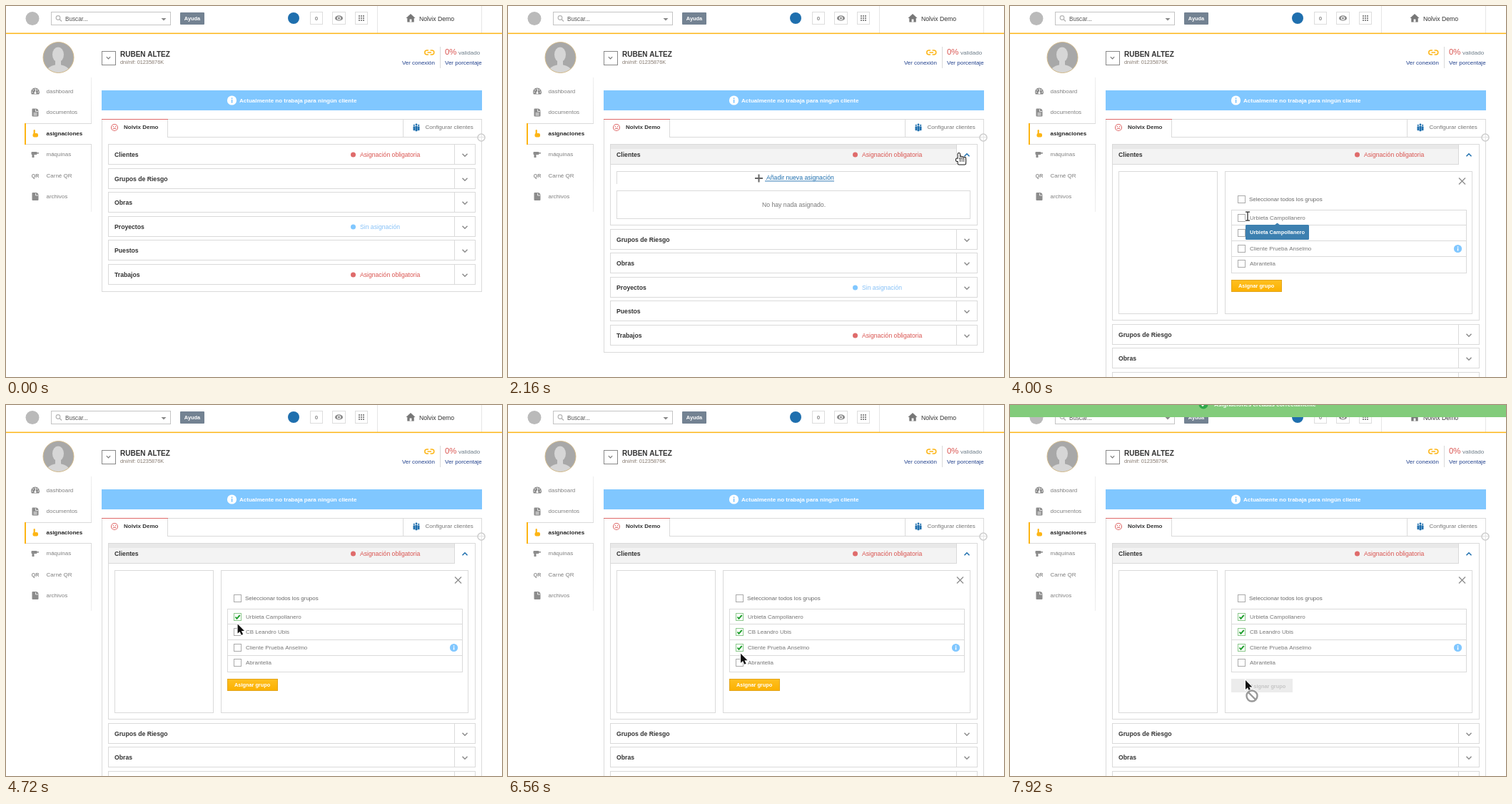
Animation of 695x519 px, one loop 8000 ms. Source, as an HTML page with a canvas:

```html
<!DOCTYPE html>
<html lang="es">
<head>
<meta charset="utf-8">
<title>Asignaciones</title>
<style>
html, body { margin: 0; width: 100%; height: 100%; overflow: hidden; background: #fff; }
canvas { display: block; width: 695px; height: 519px; }
</style>
</head>
<body>
<canvas id="stage"></canvas>
<script>
const W = 695, H = 519, LOOP = 8000, STEP = 80;
const canvas = document.getElementById('stage');
const c = canvas.getContext('2d');
const ratio = window.devicePixelRatio || 1;
canvas.width = W * ratio;
canvas.height = H * ratio;

const LINE = '#dadada', GREY = '#777', DARK = '#333', RED = '#d9534f', DOT = '#df6b6b';
const BLUE = '#1f6fae', SKY = '#80c7ff', GOLD = '#fdb515', ICON = '#8c8c8c';
const TENANT = 'Nolvix Demo';
const MENU = ['dashboard', 'documentos', 'asignaciones', 'máquinas', 'Carné QR', 'archivos'];
const SECTIONS = ['Clientes', 'Grupos de Riesgo', 'Obras', 'Proyectos', 'Puestos', 'Trabajos'];
const GROUPS = ['Urbieta Campollanero', 'CB Leandro Ubis', 'Cliente Prueba Anselmo', 'Abrantelia'];

// Moments of the story, in ms
const OPEN = 2160, FORM = 3280, SENT = 7360, NOTICE = 7725;
const TICKS = [4320, 5200, 6240];
const CLICKS = [1920, 3120, 3200, ...TICKS, 7200];

// Pointer moves: it leaves at `from` and reaches x, y at `to`
const ENTER = { to: 1040, x: 694, y: 318 };
const MOVES = [
  { from: 1040, to: 1600, x: 604, y: 234 },
  { from: 1600, to: 1840, x: 632, y: 206 },
  { from: 2320, to: 2960, x: 434, y: 242 },
  { from: 3360, to: 4000, x: 333, y: 294 },
  { from: 4000, to: 4240, x: 324, y: 294 },
  { from: 4480, to: 4880, x: 325, y: 315 },
  { from: 5600, to: 6080, x: 325, y: 337 },
  { from: 6400, to: 7120, x: 330, y: 385 }
];

function text(str, x, y, size, color, bold, align) {
  c.font = (bold ? 'bold ' : '') + size + 'px "Liberation Sans", Arial, sans-serif';
  c.fillStyle = color;
  c.textAlign = align || 'left';
  c.fillText(str, x, y);
}
function rect(x, y, w, h, color) {
  c.fillStyle = color;
  c.fillRect(x, y, w, h);
}
function frame(x, y, w, h, color = LINE) {
  c.strokeStyle = color;
  c.lineWidth = 1;
  c.strokeRect(x + .5, y + .5, w - 1, h - 1);
}
function disc(x, y, r, color, ry = r) {
  c.fillStyle = color;
  c.beginPath();
  c.ellipse(x, y, r, ry, 0, 0, 7);
  c.fill();
}
function ring(x, y, r, color, width = 1) {
  c.strokeStyle = color;
  c.lineWidth = width;
  c.beginPath();
  c.arc(x, y, r, 0, 7);
  c.stroke();
}
function roundBox(x, y, w, h, r, color) {
  c.fillStyle = color;
  c.beginPath();
  c.roundRect(x, y, w, h, r);
  c.fill();
}
function trace(pts, x, y) {
  c.beginPath();
  for (let i = 0; i < pts.length; i += 2) c.lineTo(x + pts[i], y + pts[i + 1]);
}
function line(pts, x, y, color, width) {
  trace(pts, x, y);
  c.strokeStyle = color;
  c.lineWidth = width;
  c.stroke();
}
// Isosceles triangle: base centred at x, y, apex h below (or above if negative)
function triangle(x, y, half, h, color) {
  trace([-half, 0, half, 0, 0, h], x, y);
  c.fillStyle = color;
  c.fill();
}
function chevron(x, y, color, up, s = 3.5, width = 1.5) {
  const d = up ? -s / 2 : s / 2;
  line([-s, -d, 0, d, s, -d], x, y, color, width);
}
function cross(x, y, s, color, width) {
  line([-s, -s, s, s], x, y, color, width);
  line([s, -s, -s, s], x, y, color, width);
}
function tick(x, y, color, width) {
  line([-3, 0, -1, 2.3, 3.2, -2.5], x, y, color, width);
}
function info(x, y, r, back, front) {
  disc(x, y, r, back);
  rect(x - r * .12, y - r * .15, r * .26, r * .7, front);
  rect(x - r * .12, y - r * .55, r * .26, r * .26, front);
}

function header() {
  disc(37, 17.5, 9.5, '#bababa');
  frame(63, 8, 168, 19, '#c4c4c4');
  ring(73, 16.5, 2.8, '#b5b5b5', 1.2);
  line([0, 0, 3, 3], 75, 18.5, '#b5b5b5', 1.4);
  text('Buscar...', 83, 21, 8.2, '#555');
  triangle(221, 17, 3.5, 3.5, '#888');
  roundBox(244, 9, 34, 17, 1, '#738292');
  text('Ayuda', 261, 20, 7.4, '#fff', true, 'center');
  disc(403, 17, 8, BLUE);
  frame(426, 8, 18, 18, '#ddd');
  text('0', 435, 20, 8, ICON, true, 'center');
  frame(457, 8, 19, 18, '#ddd');
  disc(466.5, 17, 5.6, ICON, 3.7);
  disc(466.5, 17, 2.6, '#fff');
  disc(466.5, 17, 1.5, ICON);
  frame(489, 8, 18, 18, '#ddd');
  for (let i = 0; i < 9; i++) rect(494 + i % 3 * 3, 13 + (i / 3 | 0) * 3, 2, 2, ICON);
  rect(520, 0, 1, 38, '#e6e6e6');
  rect(666, 0, 1, 38, '#e6e6e6');
  triangle(567, 17, 6.5, -6, GREY);
  rect(562.3, 17, 9.4, 5.5, GREY);
  rect(565.6, 18.5, 2.8, 4, '#fff');
  text(TENANT, 579, 21, 8.67, DARK);
  rect(0, 37.6, W, 1.5, GOLD);
}

function profile() {
  c.save();
  c.beginPath();
  c.arc(73.5, 72, 21.5, 0, 7);
  c.clip();
  rect(50, 50, 46, 46, '#a8a8a8');
  disc(73, 68, 8, '#d6d6d6', 10.5);
  rect(69, 74, 8, 10, '#d6d6d6');
  disc(73, 94, 17, '#d6d6d6', 12);
  c.restore();
  ring(73.5, 72, 21.5, '#d3b884', .9);
  frame(134, 63, 20, 20, '#888');
  chevron(143.5, 72.5, '#777', false, 2.7, 1.1);
  text('RUBEN ALTEZ', 160, 71, 10, DARK, true);
  text('dni/nif: 01235876K', 160, 81, 7.33, '#85796f');

  c.strokeStyle = GOLD;
  c.lineWidth = 1.5;
  c.beginPath();
  c.roundRect(586.8, 62, 13, 6, 3);
  c.stroke();
  rect(592, 60, 2.6, 10, '#fff');
  rect(590.5, 64.3, 5.5, 1.5, GOLD);
  text('Ver conexión', 555, 82, 7.95, '#1f3f8c');
  rect(608, 57, 1, 30, LINE);
  text('0%', 615, 68, 11.4, RED);
  text('validado', 634, 68, 8.1, '#6d7c88');
  text('Ver porcentaje', 615, 82, 8, '#1f3f8c');
}

function sheet(x, y, lines) {
  roundBox(x - 4.5, y - 5.5, 9, 11, [1, 4, 1, 1], ICON);
  line([.5, -4.5, .5, -1.5, 4, -1.5], x, y, '#fff', .8);
  if (lines) for (const dy of [.5, 2.8]) rect(x - 2.5, y + dy, 5, 1, '#fff');
}

function gauge(x, y) {
  c.fillStyle = ICON;
  c.beginPath();
  c.arc(x, y, 6, Math.PI * .83, Math.PI * .17);
  c.fill();
  for (let i = 0; i < 5; i++) {
    const a = Math.PI * (1 + i / 4);
    disc(x + 4.2 * Math.cos(a), y + 4.2 * Math.sin(a), .8, '#fff');
  }
  line([0, 0, 1, -4], x, y, '#fff', 1);
  disc(x, y + 1, 1.5, '#fff');
}

function sidebar() {
  const fade = c.createLinearGradient(0, 100, 0, 288);
  fade.addColorStop(0, '#eee');
  fade.addColorStop(.5, LINE);
  fade.addColorStop(1, '#eee');
  rect(119, 100, 1, 188, fade);
  rect(26, 164, 94, 30, '#fff');
  rect(26, 164, 94, 1, LINE);
  rect(26, 193, 94, 1, LINE);
  rect(26, 164, 2, 30, GOLD);
  MENU.forEach((name, i) => {
    const on = i === 2;
    text(name, 56.5, 122 + i * 29.4, 8, on ? '#222' : '#808080', on);
  });
  gauge(41, 120.5);
  sheet(41, 149, true);
  roundBox(38.6, 173, 2.2, 8, 1, GOLD);
  roundBox(37.5, 178, 7.5, 5.5, 2, GOLD);
  roundBox(35.5, 204, 8, 4, 1, ICON);
  rect(43, 205, 3, 1.5, ICON);
  rect(36.5, 207, 3, 5, ICON);
  text('QR', 41, 240, 7, ICON, true, 'center');
  sheet(41, 266.5, false);
}

function tabs(bottom) {
  rect(134, 118, 533, 28, SKY);
  info(316.5, 132, 6.6, '#fff', SKY);
  text('Actualmente no trabaja para ningún cliente', 327, 135, 8.02, '#fff', true);

  frame(134, 158, 533, bottom - 158);
  rect(227, 183, 440, 1, LINE);
  rect(226, 158, 1, 26, LINE);
  rect(556, 158, 1, 26, LINE);
  rect(134, 158, 93, 1, DOT);
  ring(152, 170, 4.5, DOT, 1.1);
  disc(150.4, 168.7, .8, DOT);
  disc(153.6, 168.7, .8, DOT);
  c.beginPath();
  c.arc(152, 173.3, 2.2, Math.PI * 1.15, Math.PI * 1.85);
  c.stroke();
  text(TENANT, 165, 172, 8, DARK, true);
  for (const dx of [-3.2, 0, 3.2]) {
    const s = dx ? .8 : 1;
    disc(575 + dx, 170 - 4 * s, 1.4 * s, BLUE);
    roundBox(575 + dx - 1.6 * s, 170 - 2.2 * s, 3.2 * s, 7.5 * s, 1, BLUE);
  }
  text('Configurar clientes', 587.5, 172, 8.08, GREY);
  disc(666, 184, 5, '#fff');
  ring(666, 184, 5, '#ccc', 1.5);
  rect(662, 183, 8, 1, '#e4e4e4');
  rect(666, 180, 1, 8, '#e4e4e4');
}

function status(y, color, ink, label) {
  disc(486.5, y + 15, 3.5, color);
  text(label, 496, y + 17.5, 8.64, ink);
}

function rows(shift, open) {
  SECTIONS.forEach((name, i) => {
    const expanded = open && i === 0;
    const y = Math.floor(193.5 + i * 33.6) + (i ? shift : 0);
    if (expanded) {
      rect(143, y, 485, 28, '#f3f3f3');
      rect(143, y, 485, 7, '#e8e8e8');
      rect(143, y + 28, 486, 1, LINE);
    }
    frame(143, y, 515, expanded ? 29 + shift : 29);
    rect(628, y, 1, 29, LINE);
    chevron(643, y + 15.5, expanded ? BLUE : ICON, expanded);
    text(name, 152, y + 18, 8.67, DARK, true);
    if (i % 5 === 0) status(y, DOT, RED, 'Asignación obligatoria');
    if (i === 3) status(y, SKY, '#86c1f7', 'Sin asignación');
  });
}

function tip(label, x, y, w) {
  const color = '#3d80b0';
  triangle(x + w / 2, y + .5, 4, -3, color);
  roundBox(x, y, w, 21, 1.5, color);
  text(label, x + w / 2, y + 12.5, 7.4, '#fff', true, 'center');
}

function emptyList(t) {
  rect(152, 231, 496, 1, LINE);
  rect(152, 231, 1, 18, LINE);
  rect(346, 240, 11, 2, '#666');
  rect(350.5, 235.5, 2, 11, '#666');
  text('Añadir nueva asignación', 362, 243, 8.67, BLUE);
  rect(360, 244.5, 97, .9, BLUE);
  frame(152, 258, 496, 40);
  text('No hay nada asignado.', 356, 281, 8.67, GREY);
  if (t >= 2880) tip('Añadir más Clientes', 358, 254, 83);
}

function checkbox(y, on) {
  frame(319, y, 11, 11, on ? '#8cc98c' : '#aaa');
  if (on) tick(324.5, y + 5.5, '#1d9e2b', 1.9);
}

function groupForm(t) {
  frame(152, 231, 139, 200);
  frame(301, 231, 347, 200);
  cross(633.5, 245, 4.5, ICON, 1.3);
  checkbox(265, false);
  text('Seleccionar todos los grupos', 335, 273, 8, '#666');
  frame(310, 285, 330, 89);
  GROUPS.forEach((name, i) => {
    const y = 291 + Math.floor(i * 21.6);
    if (i) rect(310, 284 + i * 22, 330, 1, LINE);
    checkbox(y, t >= TICKS[i] + STEP);
    text(name, 336, y + 8.3, 8, GREY);
  });
  info(627.5, 339.5, 5.6, SKY, '#fff');
  if (t < SENT) {
    const gold = c.createLinearGradient(0, 383, 0, 400);
    gold.addColorStop(0, '#ffc021');
    gold.addColorStop(1, '#fbb000');
    rect(310, 383, 71, 17, gold);
    frame(310, 383, 71, 17, '#e3a51c');
    text('Asignar grupo', 320, 394, 7.35, '#fff', true);
  } else {
    rect(310, 383, 86, 19, '#ececec');
    text('Asignar grupo', 336, 396, 7.35, '#c6c6c6', true);
  }
  if (t >= 3760 && t < 4160) tip(GROUPS[0], 330, 306, 89);
}

function notice(t) {
  if (t < NOTICE) return;
  const k = Math.min(1, (t - NOTICE) / 400);
  const y = Math.round(36 * (1 - Math.cos(Math.PI * k)) / 2 - .5) - 36;
  rect(0, y, W, 36, '#82cc7b');
  disc(271, y + 18, 6.5, '#2fa84a');
  tick(271, y + 18, '#fff', 1.4);
  text('Asignaciones creadas correctamente', 286, y + 21, 8.05, '#fff', true);
}

function arrow(x, y) {
  trace([0, 0, 0, 13, 3, 10.3, 5.2, 15.2, 7.5, 14.2, 5.3, 9.5, 9.4, 9.5], x, y);
  c.closePath();
  c.strokeStyle = '#fff';
  c.lineWidth = 2;
  c.stroke();
  c.fillStyle = '#111';
  c.fill();
}
// Same silhouette twice: grown in black, then in white
function hand(x, y) {
  for (const [g, color] of [[1, '#111'], [0, '#fff']]) {
    const part = (dx, dy, w, h) => roundBox(x + dx - g, y + dy - g, w + 2 * g, h + 2 * g, 1.3 + g, color);
    part(-4, 7.5, 4, 3.5);
    part(-1.3, 8, 10.4, 7.5);
    for (let i = 0; i < 4; i++) part(-1.3 + i * 2.7, i ? 4 + i * .6 : 0, 2.3, 8);
  }
  for (let i = 1; i < 4; i++) rect(x - 1.7 + i * 2.7, y + 6, .8, 6, '#111');
}
function beam(x, y) {
  for (const [g, color] of [[.7, '#fff'], [0, '#222']]) {
    rect(x - .6 - g, y - 6, 1.2 + 2 * g, 12, color);
    for (const dy of [-6.5, 5.5]) rect(x - 3 - g, y + dy - g, 6 + 2 * g, 1.2 + 2 * g, color);
  }
}

function pointerAt(t) {
  let at = ENTER;
  for (const m of MOVES) {
    if (t < m.from) break;
    const k = Math.min(1, (t - m.from) / (m.to - m.from));
    at = { x: at.x + (m.x - at.x) * k, y: at.y + (m.y - at.y) * k };
  }
  return at;
}

function pointer(t) {
  if (t < ENTER.to) return;
  const { x, y } = pointerAt(t);
  const within = (from, to) => t >= from && t < to;
  if (within(1840, 2400) || within(2880, FORM) || within(7040, SENT)) hand(x, y);
  else if (within(3760, 4160)) beam(x, y);
  else arrow(x, y);
  if (t >= SENT) {
    disc(x + 9, y + 22, 9.5, '#fff');
    ring(x + 9, y + 22, 7.5, '#999', 2.4);
    line([-5, -5, 5, 5], x + 9, y + 22, '#999', 2.4);
  }
  if (CLICKS.some(at => within(at, at + STEP))) {
    ring(x + 3, y + 8, 16.5, '#fff', 3);
    ring(x + 3, y + 8, 16.5, '#111', 1.2);
  }
}

function draw(t) {
  c.setTransform(ratio, 0, 0, ratio, 0, 0);
  rect(0, 0, W, H, '#fff');
  const shift = t < OPEN ? 0 : t < FORM ? 85 : 218;
  header();
  profile();
  sidebar();
  tabs(400 + shift);
  rows(shift, t >= OPEN);
  if (t >= FORM) groupForm(t);
  else if (t >= OPEN) emptyList(t);
  notice(t);
  pointer(t);
}

const start = performance.now();
function loop() {
  const t = (performance.now() - start) % LOOP;
  draw(Math.floor(t / STEP) * STEP);
  requestAnimationFrame(loop);
}
loop();
</script>
</body>
</html>
```
